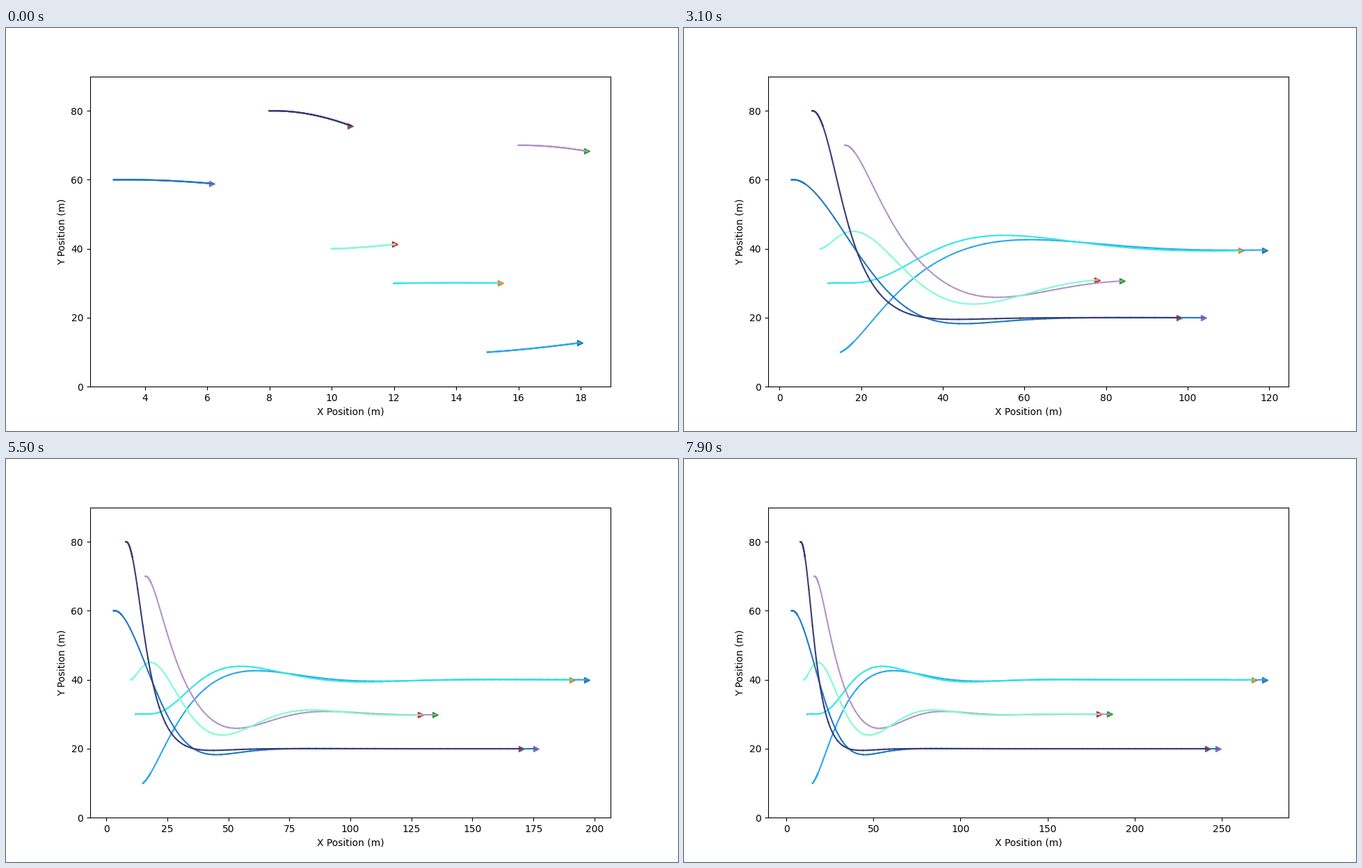
A matplotlib script for the animation above (8000 ms loop, 966 by 580 pixels).

```python
import numpy as np
import matplotlib.pyplot as plt
from matplotlib.animation import FuncAnimation

FRAMES, STEP_MS, SUBSTEPS = 80, 100, 10
GAP = 6  # metres between leader and follower once settled


def spring(t, decay, freq, start, rate):
    """Damped oscillation to zero from a start value and a start rate."""
    swing = (rate + decay * start) / freq
    return np.exp(-decay * t) * (start * np.cos(freq * t) + swing * np.sin(freq * t))


class Car:
    def __init__(self, color, x, vx, y, vy, settle=(0.2, 0.06)):
        self.color, self.settle = color, settle
        self.x, self.vx, self.y, self.vy = x, vx, y, vy


class Lane:
    """A pair sways onto the lane together while their offset closes faster."""

    def __init__(self, y, speed, slot, sway, merge, share, lead, follow):
        self.y, self.speed, self.slot = y, speed, slot
        self.sway, self.merge, self.share = sway, merge, share
        self.cars = lead, follow

    def offsets(self, t):
        a, b = self.cars
        mid, mid_rate = (a.y + b.y) / 2 - self.y, (a.vy + b.vy) / 2
        half, half_rate = (a.y - b.y) / 2, (a.vy - b.vy) / 2
        mean = spring(t, *self.sway, mid, mid_rate)
        diff = self.share * mean + spring(t, *self.merge, half - self.share * mid,
                                          half_rate - self.share * mid_rate)
        return mean + diff, mean - diff

    def positions(self, t):
        """The (x, y) of leader and follower at time t, counted in steps."""
        spots = []
        for i, (car, dy) in enumerate(zip(self.cars, self.offsets(t))):
            slot = self.slot - GAP * i
            dx = spring(t, *car.settle, car.x - slot, car.vx - self.speed)
            spots.append((slot + self.speed * t + dx, self.y + dy))
        return spots


lanes = [
    Lane(40, 3.25, 15, sway=(0.12, 0.205), merge=(0.4, 0.2), share=-0.2,
         lead=Car("#2ea6ec", 15, 2.914, 10, 1.6),
         follow=Car("#32e7e2", 12, 3.55, 30, 0.4, settle=(0.12, 0.205))),
    Lane(30, 2.123, 16, sway=(0.092, 0.181), merge=(0.4, 0.212), share=-0.2,
         lead=Car("#b394c7", 16, 2.223, 70, 0.3),
         follow=Car("#80fdd0", 10, 2.013, 40, 0.3)),
    Lane(20, 3.0, 8, sway=(0.3, 0.245), merge=(0.5, 0.12), share=0.4,
         lead=Car("#1e78c6", 3, 2.86, 60, 0.4, settle=(0.3, 0.2)),
         follow=Car("#393c76", 8, 2.9, 80, 0.6, settle=(0.3, 0.2))),
]
cars = [car for lane in lanes for car in lane.cars]


def positions(t):
    return [spot for lane in lanes for spot in lane.positions(t)]


fig, ax = plt.subplots(figsize=(9.66, 5.8), dpi=100)
ax.set_ylim(0, 90)
ax.set_yticks(range(0, 90, 20))
ax.set_xlabel("X Position (m)")
ax.set_ylabel("Y Position (m)")

heads = [ax.plot([], [], ">", color=f"C{i}")[0] for i in range(len(cars))]


def trail(step):
    t = np.linspace(step, step + 1, SUBSTEPS + 1)
    return [ax.plot(*path, color=car.color, visible=False)[0]
            for car, path in zip(cars, positions(t))]


# The opening stretch is laid down three times, which makes it look heavier.
trails = [trail(0) + trail(0) + trail(0)] + [trail(k) for k in range(1, FRAMES)]


def update(frame):
    for k, lines in enumerate(trails):
        for line in lines:
            line.set_visible(k <= frame)
    spots = positions(frame + 1)
    for head, (x, y) in zip(heads, spots):
        head.set_data([x], [y])
    lo, hi = min(car.x for car in cars), max(x for x, _ in spots)
    pad = 0.05 * (hi - lo)
    ax.set_xlim(lo - pad, hi + pad)
    return heads


anim = FuncAnimation(fig, update, frames=FRAMES, interval=STEP_MS,
                     init_func=lambda: update(0), repeat=True, repeat_delay=0)
plt.show()
```
